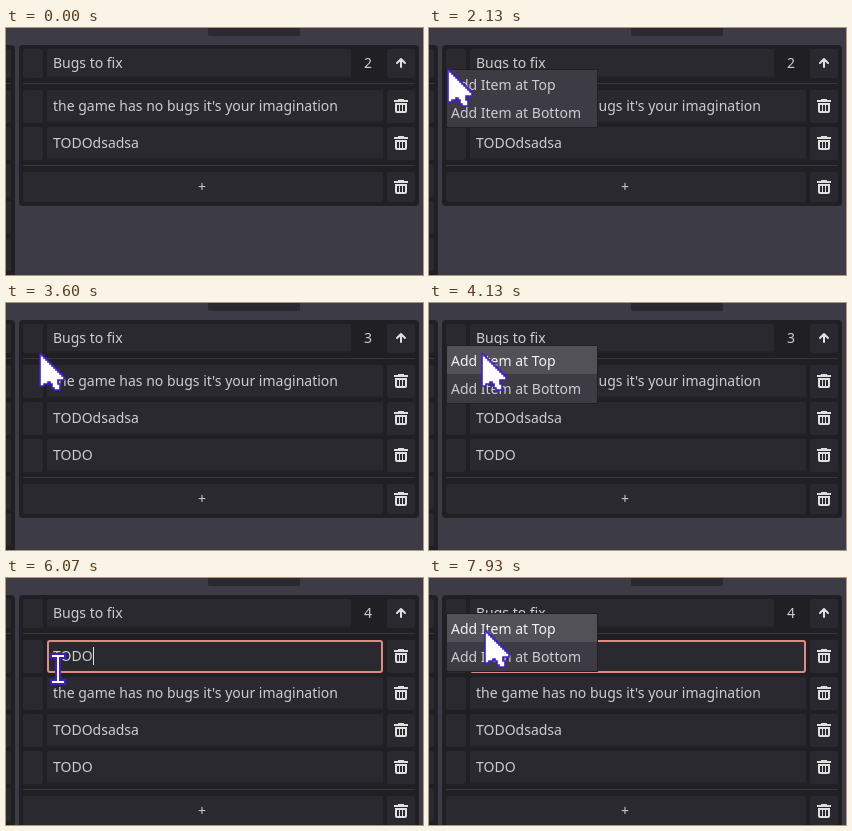
Animation of 417 by 247 pixels, one loop 8000 ms. Source, as an HTML page:

```html
<!DOCTYPE html>
<html lang="en">
<head>
<meta charset="utf-8">
<title>Bug list</title>
<style>
  html, body { margin: 0; width: 100%; height: 100%; overflow: hidden; background: #3d3b45; }
  svg { display: block; width: 417px; height: 247px; }
  text { font: 14px "Noto Sans", "Open Sans", sans-serif; fill: #cdcdcf; white-space: pre; }
  .panel { fill: #201f24; }
  .cell, .tab { fill: #2a292f; }
  .under { fill: #242328; }
  .line { fill: #37363c; }
  .up { fill: none; stroke: #e0e0e0; stroke-width: 2; stroke-linecap: round; stroke-linejoin: round; }
  #trash { fill: #e0e0e0; fill-rule: evenodd; }
  .focus { fill: none; stroke: #e18a83; stroke-width: 2; }
  .caret { fill: #e0e0e0; }
  .menu { fill: #3d3c45; stroke: #201f24; }
  .hover { fill: #525158; }
  .lit { fill: #f2f2f4; }
  .edge { fill: #3f1dcb; }
  .white { fill: #fff; }
  #arrow { fill: #fff; stroke: #3f1dcb; stroke-width: .8; }
  #beam { shape-rendering: crispEdges; }
</style>
</head>
<body>
<svg viewBox="0 0 417 247">
  <defs>
    <path id="trash" d="M5 1V2H1V4H15V2H11V1ZM2 5V13A2 2 0 0 0 4 15H12A2 2 0 0 0 14 13V5ZM4 7H6V13H4ZM7 7H9V13H7ZM10 7H12V13H10Z"/>
  </defs>
  <rect class="tab" x="202" y="-6" width="92" height="14" rx="2"/>
  <g id="side"></g>
  <g id="list"></g>
  <g id="focus">
    <rect class="focus" x="42" y="63" width="334" height="31" rx="2"/>
    <rect class="caret" x="87" y="69" width="1" height="18"/>
  </g>
  <g id="menu">
    <rect class="menu" x="17.5" y=".5" width="151" height="58"/>
    <rect id="hover" class="hover" x="18" width="150" height="28"/>
    <text x="22" y="21">Add Item at Top</text>
    <text x="22" y="49">Add Item at Bottom</text>
  </g>
  <g id="cursor">
    <path id="arrow" transform="translate(1 1) scale(2)"/>
    <g id="beam">
      <path class="edge" d="M-8 -16H8V-10H3V10H8V16H-8V10H-3V-10H-8Z"/>
      <path class="white" d="M-6 -14H6V-12H1V12H6V14H-6V12H-1V-12H-6Z"/>
    </g>
  </g>
</svg>
<script>
const LOOP = 8000, TICK = 1000 / 15;
const ROW_TOP = 62, PITCH = 37, ROW_H = 33;
const ADD_BOTTOM = 2930, ADD_TOP = 4670, FOCUS = 5470;

// Each move leaves the last resting place: start, end, x, y and an optional bend.
const moves = [
  [1400, 1400, 76, 157],
  [1470, 1930, 12, 25, [10, -37]],
  [2130, 2130, 18, 41],
  [2400, 2670, 56, 77],
  [3130, 3330, 58, 113],
  [3400, 3930, 11, 26, [27, 21]],
  [4000, 4200, 66, 58],
  [4670, 4930, 66, 64],
  [5070, 5470, 96, 79],
  [5530, 5870, 70, 96, [8, 84]],
  [6070, 6070, 52, 91],
  [6130, 6530, 23, 57, [-15, 66]],
  [6730, 6800, 3, 58],
  [7000, 7330, 130, 36],
  [7470, 7670, 13, 18],
  [7730, 7930, 55, 52]
];

// Menu: opens, closes, top edge.
const menus = [[2130, ADD_BOTTOM, 41], [3930, ADD_TOP, 42], [7670, LOOP, 35]];

const el = id => document.getElementById(id);
const show = (id, on) => { el(id).style.display = on ? "" : "none"; };
const place = (id, x, y) => el(id).setAttribute("transform", `translate(${x} ${y})`);

const box = (x, y, w, h, cls = "cell", r = 2) =>
  `<rect class="${cls}" x="${x}" y="${y}" width="${w}" height="${h}" rx="${r}"/>`;
const label = (x, y, s, anchor = "start") =>
  `<text x="${x}" y="${y}" text-anchor="${anchor}">${s}</text>`;
const rule = y => box(17, y, 392, 1, "line", 0);
const field = (y, w, h, s) =>
  box(41, y, w, h) + box(41, y + h - 2, w, 2, "under", 1) + label(47, y + Math.ceil(h / 2) + 4, s);
const bin = (y, h) =>
  box(381, y, 28, h) + `<use href="#trash" x="387" y="${y + Math.floor(h / 2) - 8}"/>`;
const rowY = i => ROW_TOP + i * PITCH;

function row(s, i) {
  const y = rowY(i);
  return box(17, y, 20, ROW_H) + field(y, 336, ROW_H, s) + bin(y, ROW_H);
}

function listMarkup(items) {
  const n = items.length, end = rowY(n) - 4, add = end + 12;
  return box(13, 17, 400, add + 17, "panel", 4) +
    box(17, 21, 20, 29) + field(21, 304, 29, "Bugs to fix") +
    label(362, 40, n, "middle") + box(381, 21, 28, 29) +
    '<path class="up" d="M395 39V31M391 35L395 31L399 35"/>' +
    rule(55) + items.map(row).join("") + rule(end + 5) +
    box(17, add, 360, 30) + label(196, add + 20, "+", "middle") + bin(add, 30);
}

function itemsAt(t) {
  const items = ["the game has no bugs it's your imagination", "TODOdsadsa"];
  if (t >= ADD_BOTTOM) items.push("TODO");
  if (t >= ADD_TOP) items.unshift("TODO");
  return items;
}

function pointerAt(t) {
  const i = moves.filter(m => m[0] <= t).length - 1;
  if (i < 0) return null;
  const [start, end, x, y, bend] = moves[i];
  const from = i ? moves[i - 1].slice(2, 4) : [x, y];
  const p = (Math.min(t, end) - start + TICK) / (end - start + TICK), q = 1 - p;
  return [x, y].map((to, k) => {
    const mid = bend ? bend[k] : (from[k] + to) / 2;
    return Math.round(q * q * from[k] + 2 * q * p * mid + p * p * to);
  });
}

function overField(x, y, n) {
  if (x < 41 || x >= 377) return false;
  if (y >= 21 && y < 50) return x < 345;
  const d = y - ROW_TOP;
  return d >= 0 && d < n * PITCH && d % PITCH < ROW_H;
}

function drawMenu(top, [x, y]) {
  const item = Math.floor((y - top - 1) / 28.5);
  const over = x > 18 && x < 168 && (item === 0 || item === 1);
  place("menu", 0, top);
  show("hover", over);
  el("hover").setAttribute("y", 1 + item * 29);
  el("menu").querySelectorAll("text").forEach((s, i) =>
    s.classList.toggle("lit", over && i === item));
}

let shown = 0;
function draw(t) {
  const items = itemsAt(t), n = items.length;
  if (n !== shown) {
    el("list").innerHTML = listMarkup(items);
    shown = n;
  }
  show("focus", t >= FOCUS);

  const pos = pointerAt(t);
  const menu = menus.find(m => t >= m[0] && t < m[1]);
  show("menu", menu);
  if (menu) drawMenu(menu[2], pos);

  show("cursor", pos);
  if (pos) {
    const beam = !menu && overField(...pos, n);
    place("cursor", ...pos);
    show("beam", beam);
    show("arrow", !beam);
  }
}

el("arrow").setAttribute("d",
  "M0 0" + "h1v1".repeat(12) + "V13H9V15H10V18H7V17H6V15H5V14H4V15H2V16H0Z");

let side = box(-10, 17, 19, 250, "panel", 4) + box(-10, 21, 15, 29) + box(0, 55, 5, 1, "line", 0);
for (let i = 0; i < 5; i++) side += box(-10, rowY(i), 15, ROW_H);
el("side").innerHTML = side;

const origin = performance.now();
function loop(now) {
  const t = Math.max(0, now - origin) % LOOP;
  const tick = Math.floor((t + 4) / TICK);
  draw(Math.min(Math.round(tick * TICK / 10) * 10, LOOP - 1));
  requestAnimationFrame(loop);
}
draw(0);
requestAnimationFrame(loop);
</script>
</body>
</html>
```
